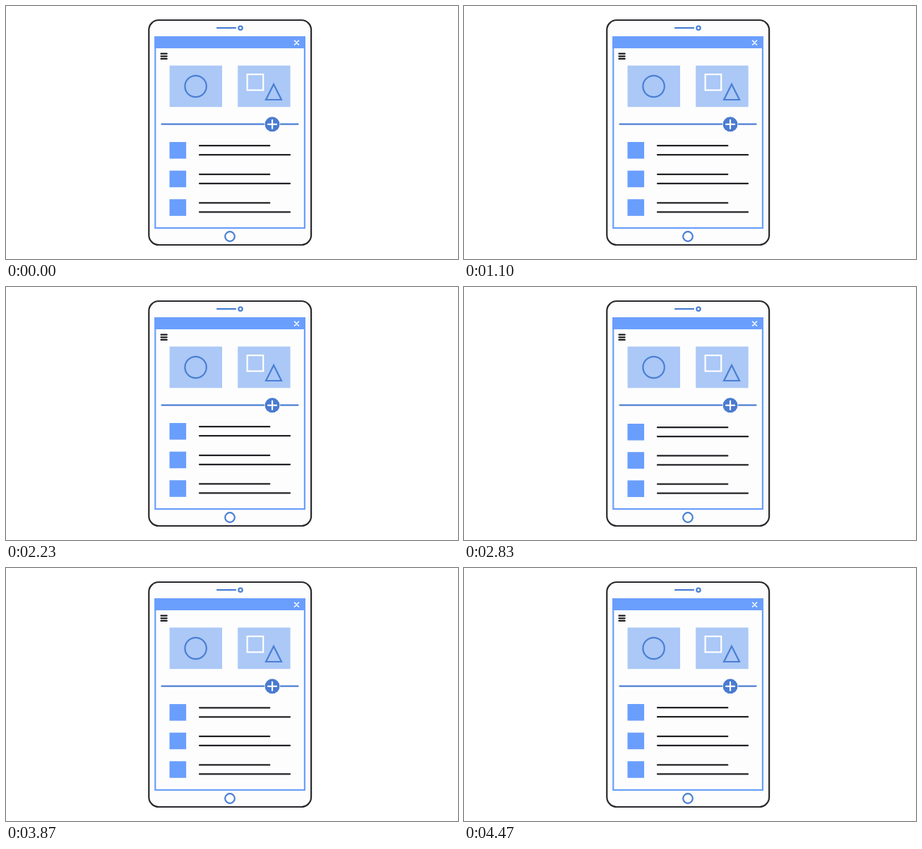
An HTML page for the animation above (5000 ms loop, 640x359 px).

```html
<!DOCTYPE html>
<html lang="en">
<head>
<meta charset="utf-8">
<title>Tablet list</title>
<style>
  html, body { margin: 0; width: 100%; height: 100%; overflow: hidden; background: #fff; }
  svg { display: block; width: 100%; height: 100%; }
</style>
</head>
<body>
<svg viewBox="0 0 640 359" fill="none" stroke-width="2.2">
  <defs>
    <clipPath id="view"><rect x="213" y="182" width="208" height="130"/></clipPath>
    <g id="item">
      <rect x="231.5" width="23.6" height="23.6" fill="#6a9efd"/>
      <path d="M274 5.2H373.3M274 18.2H402" stroke="#222226" stroke-linecap="round"/>
    </g>
  </defs>

  <!-- tablet -->
  <rect x="202.3" y="20" width="229.8" height="319" rx="14" fill="#fdfdfe" stroke="#29292d"/>
  <g stroke="#4a7fd4">
    <path d="M299 31.2H325" stroke-linecap="round"/>
    <circle cx="332" cy="31.2" r="2.7"/>
    <circle cx="317" cy="327" r="6.8"/>
  </g>

  <!-- window -->
  <rect x="211.3" y="44" width="211.6" height="271" fill="#fdfdfe" stroke="#6a9efd"/>
  <rect x="210.2" y="43" width="213.8" height="17" fill="#6a9efd"/>
  <path d="M408.5 49l6 6m0-6l-6 6" stroke="#fff" stroke-width="1.6" stroke-linecap="round"/>
  <path d="M219.5 67.7H227.7M219.5 71.3H227.7M219.5 74.9H227.7" stroke="#1c1c20" stroke-linecap="round"/>

  <!-- cards -->
  <path d="M231.6 84.6H306V143.2H231.6ZM328.2 84.6H402.6V143.2H328.2Z" fill="#abc8f6"/>
  <circle cx="268.6" cy="114" r="15.2" stroke="#4a7fd4"/>
  <rect x="341.6" y="97" width="22.6" height="22.4" stroke="#fff"/>
  <path d="M379 111L390 133H368Z" stroke="#4a7fd4"/>

  <g id="list" clip-path="url(#view)"></g>

  <!-- divider and add button -->
  <path d="M220.5 167.7H365M389 167.7H413.5" stroke="#4a7fd4" stroke-linecap="round"/>
  <circle cx="377" cy="167.8" r="10.5" fill="#4a7bd0"/>
  <path d="M371 167.8H383M377 161.8V173.8" stroke="#fff" stroke-linecap="round"/>
</svg>
<script>
const LOOP = 5000, FIRST = 513, PERIOD = 1116.7, SCROLLS = 4;
const TOP = 193, PITCH = 40.6, LAG = 33.5;
const DIP = 2, DIP_TIME = 167, RISE_TIME = 320;

const list = document.getElementById('list');
const items = Array.from({ length: 4 }, () => {
  const use = document.createElementNS('http://www.w3.org/2000/svg', 'use');
  use.setAttribute('href', '#item');
  return list.appendChild(use);
});

const bezier = (s, a, b) => 3 * s * (1 - s) ** 2 * a + 3 * s * s * (1 - s) * b + s ** 3;

// cubic-bezier(.25, .1, .25, 1)
function ease(u) {
  let lo = 0, hi = 1;
  for (let i = 0; i < 24; i++) {
    const mid = (lo + hi) / 2;
    if (bezier(mid, 0.25, 0.25) < u) lo = mid; else hi = mid;
  }
  return bezier(lo, 0.1, 1);
}

// A short dip down, then one row up
function shift(t) {
  if (t <= 0) return 0;
  if (t < DIP_TIME) return DIP * t / DIP_TIME;
  const u = Math.min(1, (t - DIP_TIME) / RISE_TIME);
  return u === 1 ? -PITCH : DIP - (PITCH + DIP) * ease(u);
}

function draw(now) {
  const t = now % LOOP - FIRST;
  const turn = Math.max(0, Math.min(SCROLLS - 1, Math.floor(t / PERIOD)));
  const local = t - turn * PERIOD;
  items.forEach((item, i) => {
    const dy = shift(local - i * LAG);
    const gone = Math.max(0, Math.min(1, -dy / PITCH));
    item.setAttribute('transform', `translate(0 ${TOP + i * PITCH + dy})`);
    item.setAttribute('opacity', i === 0 ? 1 - gone : i === 3 ? gone : 1);
  });
}

const start = performance.now();
function tick() {
  draw(performance.now() - start);
  requestAnimationFrame(tick);
}
tick();
</script>
</body>
</html>
```
